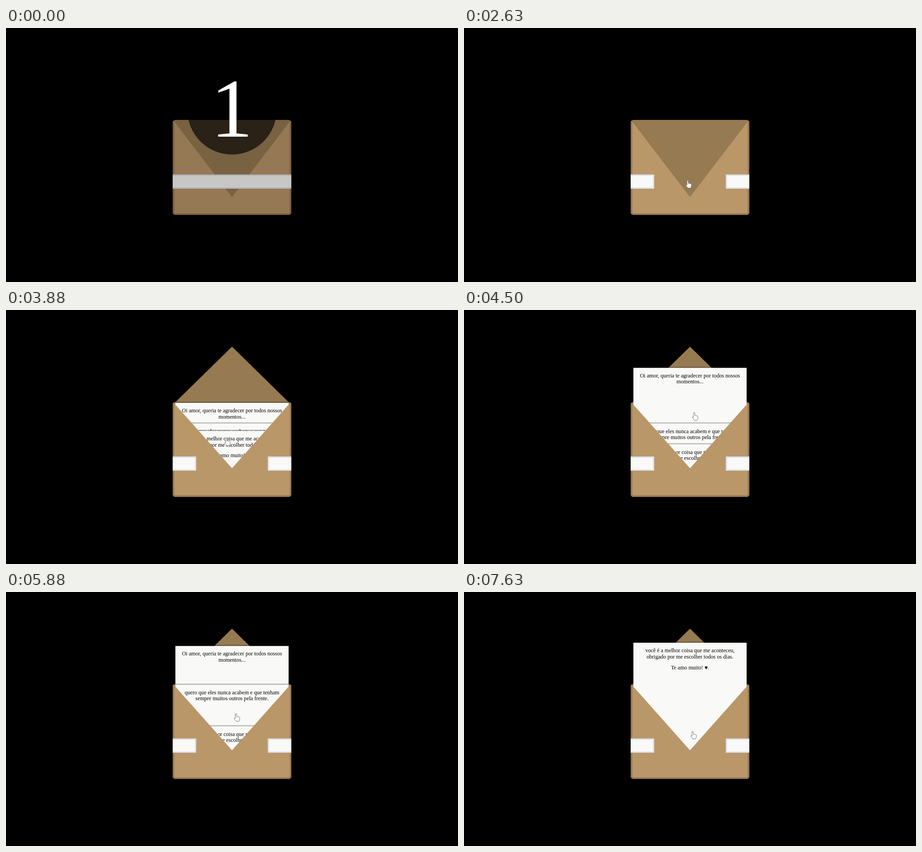
An HTML page that plays this animation: 998x561 px, repeating every 8000 ms.

```html
<!DOCTYPE html>
<html lang="pt">
<head>
<meta charset="utf-8">
<title>Carta</title>
<style>
  html, body { margin: 0; width: 100%; height: 100%; overflow: hidden; background: #000; }
  svg { display: block; width: 998px; height: 561px; }
  text { font-family: "Liberation Serif", serif; text-anchor: middle; }
  .letter text { font-size: 12.08px; fill: #000; }
  .letter rect { fill: #f9f9f8; }
  .letter .shade { fill: url(#shade); }
  .flap { fill: #967a52; }
  .paper { fill: #f9f9f7; }
  .edge { fill: #dee1e8; }
</style>
</head>
<body>
<svg viewBox="0 0 998 561">
  <defs>
    <linearGradient id="shade" x1="0" y1="0" x2="0" y2="1">
      <stop offset="0" stop-color="#000" stop-opacity="0"/>
      <stop offset="1" stop-color="#000" stop-opacity=".5"/>
    </linearGradient>
    <clipPath id="inside"><rect x="368" y="0" width="262" height="405"/></clipPath>
  </defs>

  <path id="flapBack" class="flap"/>
  <rect x="368" y="203" width="262" height="210" rx="7" fill="#957752"/>
  <g id="letters" clip-path="url(#inside)"></g>

  <path fill="#ba9769" d="M368 209Q368 204 371 205.500L374 209L499 349.500L624 209L627 205.500Q630 204 630 209V406Q630 413 623 413H375Q368 413 368 406Z"/>
  <path fill="none" stroke="#957752" stroke-width="3.500" d="M369.750 207V406Q369.750 411.250 375 411.250H623Q628.250 411.250 628.250 406V207"/>

  <path id="flapFront" class="flap"/>

  <g id="beltWhole">
    <rect class="edge" x="368" y="323.500" width="262" height="31.500"/>
    <rect class="paper" x="368" y="326.500" width="262" height="25.500"/>
  </g>
  <g id="beltTorn">
    <path class="edge" d="M368 323.500h52v31.500h-52zM578 323.500h52v31.500h-52z"/>
    <path class="paper" d="M368 326.500h49v25.500h-49zM581 326.500h49v25.500h-49z"/>
  </g>

  <g id="count">
    <rect width="998" height="561" opacity=".2"/>
    <circle cx="499" cy="181" r="98.500" opacity=".65"/>
    <text x="498.500" y="240" font-size="185" fill="#fff">1</text>
  </g>

  <path id="hand" fill="#fff" stroke="#666" stroke-width=".9" stroke-linejoin="round"
    d="M-3.600 2V-7a1.400 1.400 0 0 1 2.800 0V-2.200l5 1q2.200.5 2.100 2.600l-.7 4.200L4.200 8.500H-1.600L-5.800 3q-.8-1.600.6-1.900z"/>
</svg>

<script>
const LOOP = 8000, STEP = 125;
const $ = id => document.getElementById(id);
const mix = (a, b, k) => a + (b - a) * k;
const clamp = k => Math.max(0, Math.min(1, k));
const show = (el, on) => el.setAttribute("visibility", on ? "visible" : "hidden");

// cubic-bezier(.25, .1, .25, 1)
function ease(x) {
  if (x <= 0 || x >= 1) return clamp(x);
  const at = (a, b, s) => 3 * a * s * (1 - s) ** 2 + 3 * b * s * s * (1 - s) + s ** 3;
  let lo = 0, hi = 1;
  for (let i = 0; i < 24; i++) {
    const mid = (lo + hi) / 2;
    if (at(.25, .25, mid) < x) lo = mid; else hi = mid;
  }
  return at(.1, 1, lo);
}

// Each move: start time, target top, duration
const letters = [
  { rest: 205, moves: [[4050, 112.5, 850], [5808, 205, 850]],
    lines: ["Oi amor, queria te agradecer por todos nossos", "momentos..."] },
  { rest: 250.5, moves: [[5697, 112, 850], [6880, 250.5, 850]],
    lines: ["quero que eles nunca acabem e que tenham", "sempre muitos outros pela frente."] },
  { rest: 296.5, moves: [[3763, 112, 850], [3950, 296.5, 450], [6765, 112, 850]],
    lines: ["você é a melhor coisa que me aconteceu,", "obrigado por me escolher todos os dias.", "Te amo muito! ♥."] }
];
const baselines = [21, 34.7, 58.6];

for (const letter of letters) {
  $("letters").insertAdjacentHTML("beforeend",
    `<g class="letter"><rect class="shade" x="374" y="-3" width="250" height="3"/>
     <rect x="374" width="250" height="300"/>` +
    letter.lines.map((s, i) => `<text x="499" y="${baselines[i]}">${s}</text>`).join("") + "</g>");
  letter.el = $("letters").lastElementChild;
}

function topOf({ rest, moves }, t, n = moves.length) {
  while (n && moves[n - 1][0] > t) n--;
  if (!n) return rest;
  const [start, target, span] = moves[n - 1];
  return mix(topOf({ rest, moves }, start, n - 1), target, ease((t - start) / span));
}

// Pointer path: time, x, y
const path = [
  [1130, 560, 392], [1380, 510, 356], [1630, 498, 350], [2500, 498, 350], [2630, 496, 345],
  [3130, 496, 345], [3700, 490, 300], [3880, 489, 291], [4005, 500, 226], [4380, 510, 234],
  [5130, 512, 240], [5600, 512, 242], [5755, 510, 272], [5880, 510, 277], [6600, 510, 280],
  [6765, 509, 311], [6880, 509, 314], [7630, 507, 316]
];

function pointer(t) {
  const i = path.findIndex(p => p[0] > t);
  if (i < 0) return path[path.length - 1].slice(1);
  const a = path[Math.max(0, i - 1)], b = path[i];
  const k = clamp((t - a[0]) / (b[0] - a[0] || 1));
  return [mix(a[1], b[1], k), mix(a[2], b[2], k)];
}

function draw(now) {
  const t = now % LOOP;
  const q = Math.floor(t / STEP) * STEP + 5;

  show($("count"), t < 130);
  show($("beltWhole"), t < 1380);
  show($("beltTorn"), t >= 1380);

  const open = ease((q - 3050) / 720);
  const turn = Math.cos(Math.PI * open);
  const half = mix(128, 125.5, open), base = mix(206, 204, open);
  const tip = base + turn * mix(167.5, 123, open);
  const d = turn > 0
    ? `M${499 - half} ${base}Q371 203 375 203H623Q627 203 ${499 + half} ${base}L499 ${tip}Z`
    : `M${499 - half} ${base}H${499 + half}L499 ${tip}Z`;
  $("flapFront").setAttribute("d", d);
  $("flapBack").setAttribute("d", d);
  show($("flapFront"), turn > 0);
  show($("flapBack"), turn <= 0);

  for (const letter of letters)
    letter.el.setAttribute("transform", `translate(0 ${topOf(letter, q).toFixed(2)})`);

  show($("hand"), t >= 1130);
  $("hand").setAttribute("transform", `translate(${pointer(q)})`);
}

const born = performance.now();
(function tick() {
  draw(performance.now() - born);
  requestAnimationFrame(tick);
})();
</script>
</body>
</html>
```
